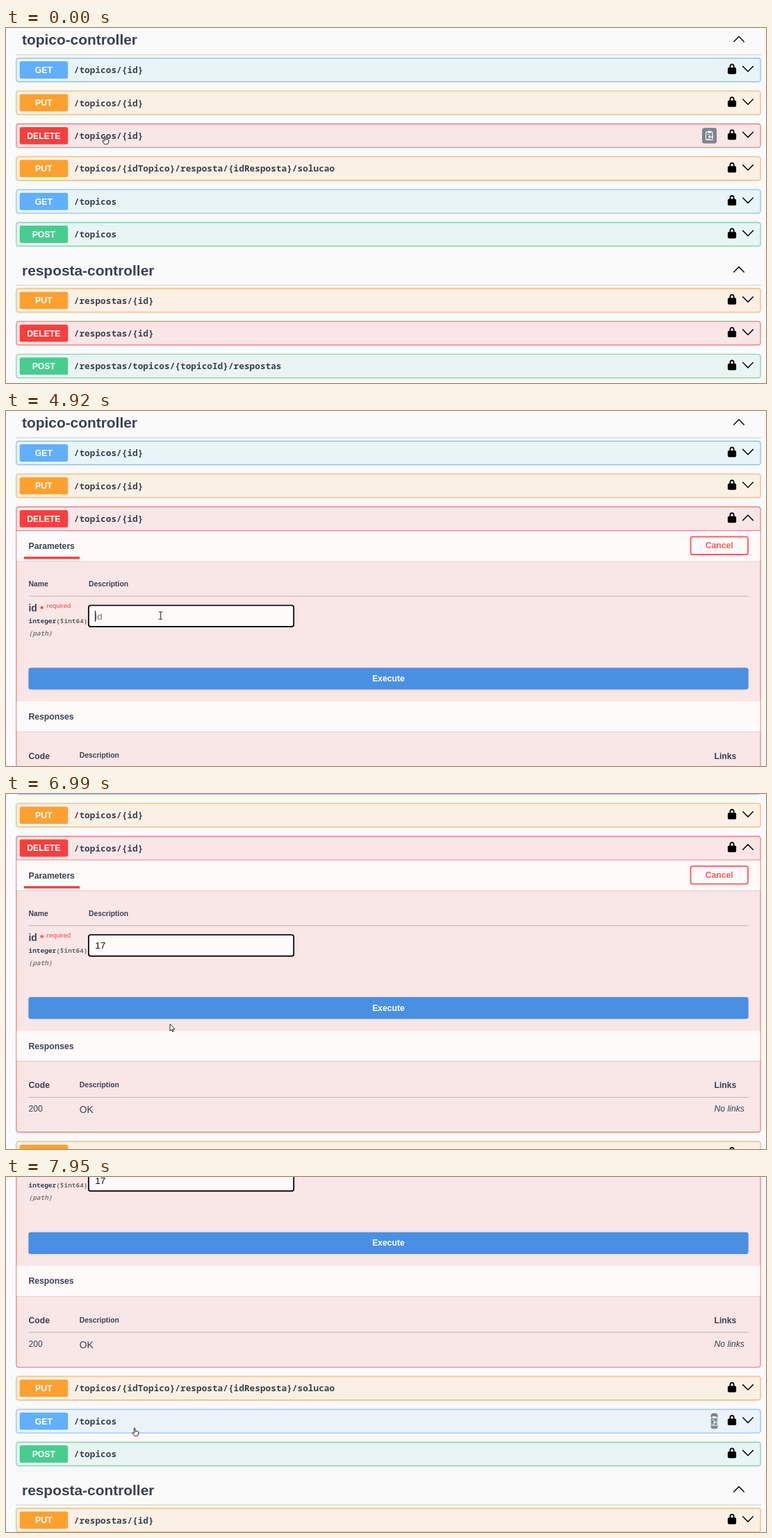
Write an HTML page with a canvas that moves like this. It is 1094 px wide and 512 px high and loops after 8 s.

```html
<!DOCTYPE html>
<html lang="pt">
<head>
<meta charset="utf-8">
<title>API console</title>
<style>
  html, body { margin: 0; width: 100%; height: 100%; overflow: hidden; background: #fafafa; }
  canvas { display: block; }
</style>
</head>
<body>
<canvas id="stage" width="1094" height="512"></canvas>
<script>
const ctx = document.getElementById('stage').getContext('2d');
const LOOP = 8000, PITCH = 47.4;
const SANS = '"Liberation Sans", Arial, sans-serif';
const MONO = '"Noto Sans Mono", "DejaVu Sans Mono", monospace';
const INK = '#3b4151', RED = '#f93e3e';

const METHODS = {
  GET: ['#61affe', '#e8f4f6'],
  PUT: ['#fca130', '#faf0e4'],
  DELETE: [RED, '#f9e6e6'],
  POST: ['#49cc90', '#e8f5f2'],
};
const SECTIONS = [
  ['topico-controller', [
    ['GET', '/topicos/{id}'],
    ['PUT', '/topicos/{id}'],
    ['DELETE', '/topicos/{id}'],
    ['PUT', '/topicos/{idTopico}/resposta/{idResposta}/solucao'],
    ['GET', '/topicos'],
    ['POST', '/topicos'],
  ]],
  ['resposta-controller', [
    ['PUT', '/respostas/{id}'],
    ['DELETE', '/respostas/{id}'],
    ['POST', '/respostas/topicos/{topicoId}/respostas'],
  ]],
];

// Pointer steps: start time, shape, x, y
const POINTER = [
  [0, 'hand', 142, 156], [770, 'hand', 160, 166], [890, 'arrow', 188, 200],
  [1010, 'arrow', 235, 245], [1130, 'arrow', 298, 281], [1280, 'arrow', 970, 248],
  [1440, 'arrow', 980, 231], [1590, 'arrow', 1003, 212], [1710, 'hand', 1026, 197],
  [1840, 'hand', 1028, 194], [2250, 'arrow', 640, 248], [2370, 'beam', 252, 298],
  [2520, 'beam', 236, 296], [2640, 'beam', 226, 295], [2770, 'beam', 222.5, 295],
  [6170, 'beam', 253, 283], [6440, 'beam', 260, 282], [6570, 'beam', 265, 282],
  [6720, 'arrow', 260, 300], [6860, 'arrow', 248, 320], [6990, 'arrow', 236, 332],
  [7150, 'arrow', 230, 346], [7290, 'arrow', 223, 359], [7410, 'arrow', 214, 366],
  [7530, 'arrow', 206, 367], [7680, 'arrow', 200, 368], [7800, 'arrow', 195, 368],
  [7950, 'hand', 185, 362],
];
const SCROLL = [[0, 0], [6720, 2], [6860, 40], [6990, 77.3], [7150, 104], [7290, 137.3],
  [7410, 172], [7530, 206], [7680, 255], [7800, 290.7]];
const COPY_WIDTH = [[0, 21], [1010, 15], [1130, 9], [1280, 0], [7950, 10]];
const CARET = [[0, 0], [2770, 1], [3320, 0], [3840, 1], [4340, 0], [4920, 1], [5760, 0],
  [6290, 1], [6720, 0]];
const TYPED = [[0, ''], [5200, '1'], [5330, '17']];

const at = (steps, t) => steps.findLast(step => step[0] <= t).slice(1);

function text(str, x, middle, size, { color = INK, font = SANS, style = 'bold', align = 'left' } = {}) {
  ctx.font = `${style} ${size}px ${font}`;
  ctx.fillStyle = color;
  ctx.textAlign = align;
  ctx.fillText(str, x, middle + size * 0.36);
}

function rect(x, y, w, h, color) {
  ctx.fillStyle = color;
  ctx.fillRect(x, y, w, h);
}

function box(x, y, w, h, { r = 3.5, fill, stroke, line = 1, shadow = 0 }) {
  ctx.beginPath();
  ctx.roundRect(x, y, w, h, r);
  if (fill) {
    ctx.save();
    ctx.shadowColor = 'rgba(0,0,0,.22)';
    ctx.shadowBlur = shadow;
    ctx.fillStyle = fill;
    ctx.fill();
    ctx.restore();
  }
  if (stroke) {
    ctx.strokeStyle = stroke;
    ctx.lineWidth = line;
    ctx.stroke();
  }
}

function polyline(points, color, width, fill) {
  ctx.beginPath();
  points.forEach(([x, y]) => ctx.lineTo(x, y));
  if (fill) {
    ctx.closePath();
    ctx.fillStyle = fill;
    ctx.fill();
  }
  ctx.strokeStyle = color;
  ctx.lineWidth = width;
  ctx.lineJoin = ctx.lineCap = 'round';
  ctx.stroke();
}

function chevron(x, y, up) {
  const d = up ? -3.7 : 3.7;
  polyline([[x - 7.3, y - d], [x, y + d], [x + 7.3, y - d]], '#111', 1.6);
}

function lock(x, y) {
  ctx.beginPath();
  ctx.moveTo(x - 2.6, y);
  ctx.lineTo(x - 2.6, y - 3.2);
  ctx.bezierCurveTo(x - 2.6, y - 7.2, x + 2.6, y - 7.2, x + 2.6, y - 3.2);
  ctx.lineTo(x + 2.6, y);
  ctx.strokeStyle = '#000';
  ctx.lineWidth = 1.8;
  ctx.stroke();
  box(x - 6.1, y - 1.6, 12.2, 9.4, { r: 1.8, fill: '#000' });
}

function copyButton(middle, width) {
  if (!width) return;
  const x = 1026 - width / 7 - width;
  const center = x + width / 2;
  ctx.save();
  box(x, middle - 11.5, width, 22.5, { r: 3.5, fill: '#7d8493' });
  ctx.clip();
  box(center - 5, middle - 5.5, 9.5, 11.5, { r: 1, stroke: '#fff', line: 1.1 });
  rect(center - 2.5, middle - 7, 5, 3, '#fff');
  polyline([[center + 5, middle + 1.5], [center - 1, middle + 1.5]], '#fff', 1.1);
  polyline([[center + 1, middle - 0.5], [center - 1, middle + 1.5], [center + 1, middle + 3.5]], '#fff', 1.1);
  for (const dy of [-2.5, 4]) rect(center - 3, middle + dy, 3, 1, '#fff');
  ctx.restore();
}

function band(y, title) {
  rect(15.5, y + 43.5, 1070, 1, 'rgba(0,0,0,.12)');
  rect(15.5, y, 1070, 43.5, '#fefaf9');
  text(title, 32.5, y + 21.8, 12.2);
}

function rule(y) {
  rect(32.5, y, 1036, 1, 'rgba(59,65,81,.32)');
}

function field(top, t) {
  const focused = t >= 2770;
  const value = at(TYPED, t)[0];
  const middle = top + 157.3;
  box(118.9, top + 142, 295.3, 30.6, focused
    ? { r: 3, fill: '#fefaf9', stroke: '#111', line: 1.9 }
    : { r: 3.5, fill: '#fefaf9', stroke: '#dcd3d3' });
  text(value || 'id', 128.2, middle, 13.6, { style: '', color: value ? '#111' : '#757575' });
  if (at(CARET, t)[0]) rect(128 + value.length * 7.5, top + 149.5, 1, 16, '#111');
}

function actionButton(top, t, trying) {
  const hover = t >= 1710 && t < 2250;
  const [x, label, color, ink] = trying
    ? [985.5, 'Cancel', '#fb5c5c', '#fb5c5c']
    : [974, 'Try it out', hover ? '#6f6f6f' : '#8c8c8c', INK];
  const w = 1068 - x;
  box(x, top + 43, w, 25.6, { r: 3, fill: '#fefaf9', stroke: color, line: 1.8, shadow: hover ? 5 : 2 });
  text(label, x + w / 2, top + 55.7, 12.2, { color: ink, align: 'center' });
}

function panel(top, t, trying) {
  rect(15, top + 33.5, 1071, 1, '#f26b6b');
  band(top + 34.5, 'Parameters');
  rect(26, top + 71.7, 80, 3.4, RED);
  actionButton(top, t, trying);

  text('Name', 32.5, top + 111.2, 10.4);
  text('Description', 119, top + 111.2, 10.4);
  rule(top + 128.2);
  text('id', 32.5, top + 145.8, 13.9);
  text('*', 49, top + 146.5, 13.5, { color: '#f33' });
  text('required', 58.5, top + 142, 9.5, { color: '#f44', style: '' });
  text('integer', 32.5, top + 164.2, 9.45, { font: MONO });
  text('($int64)', 72.2, top + 164.2, 9.45, { font: MONO, color: '#6b6b6b' });
  text('(path)', 32.5, top + 182, 9.45, { font: MONO, color: '#808080', style: 'italic 600' });
  field(top, t);

  if (trying) {
    box(32.5, top + 232, 1036, 31.2, { r: 3, fill: '#4990e2', shadow: 2 });
    text('Execute', 550.5, top + 247.4, 12.2, { color: '#fff', align: 'center' });
  }
  const y = top + (trying ? 0 : -31.5);
  band(y + 280.4, 'Responses');
  text('Code', 32.5, y + 358.8, 12.2);
  text('Description', 105.7, y + 358.3, 10.4);
  text('Links', 1019.5, y + 358.8, 12.2);
  rule(y + 375.8);
  text('200', 32.5, y + 392.8, 12.2, { style: '' });
  text('OK', 105.7, y + 394, 13.9, { style: '' });
  text('No links', 1019.5, y + 392.8, 12.2, { style: 'italic' });
}

function operation([method, path], top, height, late) {
  const [color, tint] = METHODS[method];
  const middle = top + 17;
  const fill = late && method === 'GET' ? '#ebf3fb' : tint;
  box(15, top, 1071, height, { fill, shadow: 3 });
  ctx.globalAlpha = 0.68;
  box(15, top, 1071, height, { stroke: color, line: 1.1 });
  ctx.globalAlpha = 1;
  box(19.7, top + 4.5, 69.5, 24.8, { r: 2.6, fill: color });
  text(method, 54.3, middle, 12.2, { color: '#fff', align: 'center' });
  text(path, 97.8, middle, 12.78, { font: MONO });
  lock(1045, middle - 2);
  chevron(1068, middle - 1.5, height > 40);
}

function page(t) {
  const scroll = at(SCROLL, t)[0];
  const open = t >= 500, trying = t >= 1980;
  let y = -scroll;
  SECTIONS.forEach(([title, rows], section) => {
    text(title, 23, y + 16.7, 20.9);
    chevron(1055, y + 16, true);
    rect(14, y + 38.2, 1073, 1, 'rgba(59,65,81,.25)');
    let top = y + 43.6;
    rows.forEach((row, i) => {
      const expanded = open && section === 0 && i === 2;
      const height = expanded ? (trying ? 426.5 : 395) : 33.8;
      operation(row, top, height, scroll > 100);
      if (expanded) panel(top, t, trying);
      if (section === 0 && i === (t < 4000 ? 2 : 4)) copyButton(top + 17, at(COPY_WIDTH, t)[0]);
      top += height + PITCH - 33.8;
    });
    y = top + 4.3;
  });
}

const SHAPES = {
  arrow: [[0, 0], [0, 9.6], [2.2, 7.7], [3.7, 11], [5.1, 10.4], [3.7, 7.2], [6.6, 7]],
  hand: [[-1, 0.5], [0, 0], [1, 0.8], [1.2, 4], [4.6, 4.8], [6, 5.8], [5.6, 9], [4.6, 11.4],
    [-0.4, 11.4], [-3, 7.6], [-2.6, 6.4], [-1, 7.4]],
};

function pointer(t) {
  const [shape, x, y] = at(POINTER, t);
  ctx.save();
  ctx.translate(x, y);
  if (shape === 'beam') {
    polyline([[0, -5], [0, 5]], '#555', 1.5);
    for (const dy of [-5.3, 5.3]) polyline([[-2.3, dy], [2.3, dy]], '#555', 1.2);
  } else {
    polyline(SHAPES[shape], '#222', 0.95, '#fff');
    if (shape === 'hand') polyline([[1.2, 4], [1.2, 6]], '#222', 0.8);
  }
  ctx.restore();
}

function frame(now) {
  const t = now % LOOP;
  rect(0, 0, 1094, 512, '#fafafa');
  page(t);
  pointer(t);
  requestAnimationFrame(frame);
}
requestAnimationFrame(frame);
</script>
</body>
</html>
```
